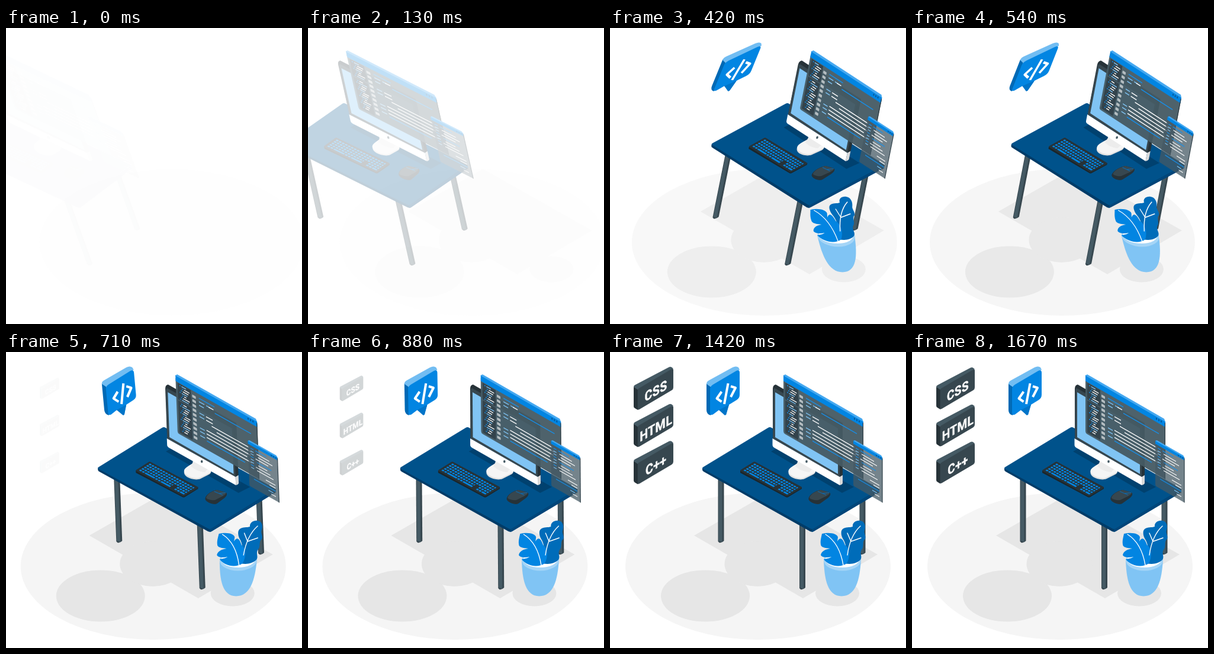
An HTML page for the animation above (1710 ms loop, 500x500 px).

```html
<!DOCTYPE html>
<html lang="en">
<head>
<meta charset="utf-8">
<title>Developer desk</title>
<style>
html, body { margin: 0; width: 100%; height: 100%; overflow: hidden; background: #fff; }
svg { display: block; width: 100%; height: 100%; }
.main { fill: #0285e2; }
.ink { fill: #263238; }
.slate { fill: #37474f; }
.steel { fill: #455a64; }
.pale { fill: #80c4f4; }
.line { fill: none; stroke: #fff; stroke-linecap: round; stroke-linejoin: round; }
text {
  font: 700 22px Roboto, sans-serif; letter-spacing: .4px; text-anchor: middle;
  fill: #fafafa; stroke: #fafafa; stroke-width: .5px; stroke-linejoin: round;
}
</style>
</head>
<body>
<svg viewBox="0 0 500 500">
  <g id="floor">
    <ellipse cx="250" cy="362" rx="224" ry="124" fill="#f5f5f5"/>
    <g fill="#e6e6e6">
      <path d="M142 310 268 238 452 342 326 416Z"/>
      <ellipse cx="161" cy="412" rx="75" ry="43.5"/>
      <ellipse cx="249" cy="358" rx="55.5" ry="38"/>
      <ellipse cx="384" cy="407.500" rx="37" ry="22"/>
    </g>
  </g>

  <g id="desk">
    <g id="legs"></g>
    <path d="M156 196V199Q156 201 159 202.500L338 303Q341 304.500 344 303L455 237V231L341 296Z" fill="#003c68"/>
    <path d="M341 299 455 231V237L344 303Q342 304 341 304Z" fill="#00467a"/>
    <path d="M158 194 267 128Q270 126 273 128L455 231 344 298Q341 300 338 298L158 198Q154 196 158 194Z" fill="#00528b"/>
    <path d="M272 168 290 158 412 228 392 238Z" fill="#00416f"/>

    <path d="M220 200V204L297 245Q299 246 301 245L324 231V228L299 240Z" fill="#1b2529"/>
    <path d="M221 199 242 186Q244 184.500 246 186L323 227.500Q325 229 323 230.500L301 243Q299 244 297 243L221 201.500Q219 200.500 221 199Z" class="ink"/>
    <g id="keys" transform="matrix(1 .55 -1 .62 244 185)" stroke="#0285e2" stroke-width="2.600"></g>

    <path d="M335.500 249C335 241 348 234 356 233L370 237C375 239 371 245 366 248L355 256C350 259 337 254 335.500 249Z" class="ink"/>
    <path d="M337 246C339 239 350 234 356 233L370 237C373 239 367 243 362 245L352 250C347 251 338 249 337 246Z" class="slate"/>
    <path d="M351 235.500 365 241.500M359 239 370 237.500" fill="none" stroke="#0a6cb5"/>

    <path d="M301.500 201C302 196 312 192 318 188L345 198C349 201 347 205 343 207L329 214C323 217 312 215 306 211 302 208 301 205 301.500 201Z" fill="#e0e0e0"/>
    <path d="M302 199C304 195 312 191 318 187L345 197C349 200 347 203 343 205L328 212C322 215 312 212 306 208 302 205 301 202 302 199Z" fill="#f5f5f5"/>
    <path d="M317 177 346 193C346 198 340 197 337 203 328 203 316 197 313 192 318 188 317 183 317 177Z" fill="#ececec"/>
    <path d="M275 62Q275 56 280 55L393 120V208L388 211 275 146Z" class="ink"/>
    <path d="M276 64Q276 60 280 62L388 124V211L275 146Z" class="slate"/>
    <path d="M279 68 385 129V206L279 144Z" class="pale"/>
    <path d="M274.500 146 388 211V225L278 162Q274.500 160 274.500 157Z" fill="#fff"/>
    <path d="M388 211 393 208V222Q391 225 388 225Z" fill="#d9d9d9"/>
    <ellipse cx="332" cy="185" rx="1.800" ry="2.300" class="steel"/>

    <g id="editor" transform="matrix(1 .577 0 1 293 38)">
      <path d="M0 6H135V99H3Q0 99 0 96Z" fill="#455a64" opacity=".95"/>
      <path d="M3 12H25V96H3Z" fill="#2c3a42" opacity=".75"/>
      <path d="M3 41H25" stroke="#455a64" stroke-width="2"/>
      <path d="M0 2Q0 0 2 0H133L135 2V11H0Z" class="main"/>
      <path d="M0 2 3-2H133L135 2Z" fill="#45a8f0"/>
      <path d="M134.500 4V99" stroke="#263238"/>
      <path d="M119 5.500h2m2 0h2m2 0h2" stroke="#0a5795" stroke-width="3"/>
    </g>
    <g id="panel" transform="matrix(1 .577 0 1 411 149)">
      <path d="M0 4H49V77H2Q0 77 0 75Z" fill="#455a64" opacity=".74"/>
      <path d="M0 1 2-1H47L49 1V6H0Z" class="main"/>
      <path d="M0 1 3-1.500H47L49 1Z" fill="#45a8f0"/>
      <path d="M49 2V77" stroke="#37474f" stroke-width="1.300"/>
      <path d="M38 3.500h2m1.500 0h2m1.500 0h2" stroke="#0a5795" stroke-width="2"/>
    </g>
  </g>

  <g id="plant">
    <path d="M361 350C362 386 368 412 391 412.500 415 412 422 386 424 350Z" class="pale"/>
    <ellipse cx="392.500" cy="352" rx="31.300" ry="17.500" fill="#a5d5f7"/>
    <ellipse cx="392.500" cy="350" rx="29" ry="14" fill="#fff"/>
    <path d="M396 352C400 340 400 328 395 318 390 311 389 302 393 299 398 295 405 297 410 295 409 288 416 284 423 285 431 286 432 295 430 301 428 306 433 310 431 316 425 320 430 329 425 334 421 340 427 346 423 351 416 358 406 359 396 357Z" fill="#006cb9"/>
    <path d="M358 307C372 304 384 307 385 313L384 320C390 310 394 318 397 326 405 332 406 346 400 357 389 365 370 362 361 350 367 349 372 348 374 346 366 348 358 347 356 343 357 336 365 333 372 332 363 331 356 330 356 325 355 318 357 313 358 307Z" class="main"/>
    <path class="line" stroke-width="1.400" d="M364 308C380 318 390 336 394 360M423 294C411 305 404 321 401 343M401 306 407 320 424 314"/>
  </g>

  <g id="bubble">
    <path d="M163 53 170 58V107Q163 105 163 98Z" fill="#0069b5"/>
    <path d="M163 54Q163 50 167 48L207 26Q213 23 217 26L219 30 170 59Z" fill="#72bdf2"/>
    <path d="M169 63Q169 58 174 55L213 32Q219 29 219 35V72Q219 78 214 81L201 89 196 106 184 98 174 105.500Q169 108 169 103Z" class="main"/>
    <path d="M184 98 194 107 196 106 201 89Z" fill="#0074c8"/>
    <path class="line" stroke-width="4" style="stroke-linecap:butt" d="M188.500 67 180.500 78.500 188.500 84M199.500 53 193 88M204 58 212 60.500 204 76"/>
  </g>

  <g id="labels"></g>
</svg>
<script>
const LOOP = 1710, STEPS = 41, LEAD = 0.031;
const $ = id => document.getElementById(id);
const add = (id, markup) => $(id).insertAdjacentHTML('beforeend', markup);
const stroke = (x1, x2, y, color, width = 1.5) =>
  `<path d="M${x1} ${y}H${x2}" stroke="${color}" stroke-width="${width}"/>`;

const WHITE = '#fff', LIGHT = '#80c4f4', BLUE = '#1590ec';

for (const [x, top, bottom] of [[182.5, 205, 322], [421.5, 235, 342], [320, 280, 401]])
  add('legs', `<path d="M${x} ${top}h10V${bottom - 3}q-4 4-8 3l-2-2Z" class="slate"/>
    <path d="M${x + 1} ${top}h6V${bottom - 1}l-6-2Z" class="steel"/>`);

for (let row = 0; row < 5; row++) {
  const y = 4 + row * 4.1;
  const keys = row < 3 ? 'H77' : 'H54M61 ' + y + 'H77';
  add('keys', `<path d="M3 ${y}${keys}" stroke-dasharray="${row == 4 ? '3.2 1.3 3.2 1.3 16 1.3' : '3.2 1.3'}"/>`);
}

// Sidebar rows, bullets and code lines, in the plane of the editor window
for (let i = 0; i < 21; i++) {
  if (i == 7) continue;
  const y = 15 + i * 3.8, indent = 6 + (i * 5 % 3) * 2, end = 17 + (i * 7 % 4) * 1.8;
  add('editor', stroke(indent, indent + 2, y, BLUE) + stroke(indent + 3.5, end, y, i % 3 ? WHITE : LIGHT));
}
for (let i = 0; i < 10; i++)
  add('editor', `<rect x="27" y="${18 + i * 7.7}" width="6" height="4.500" rx="1" fill="#b4bdc1"/>`);

const code = [
  [38, 64, 18, BLUE], [38, 47, 24, LIGHT], [50, 56, 24, LIGHT],
  [38, 46, 30, LIGHT], [54, 62, 24, WHITE], [64, 124, 28.5, BLUE],
  [38, 46, 43, LIGHT], [38, 46, 49, LIGHT], [49, 60, 43, WHITE], [49, 60, 49, WHITE],
  [58, 120, 54, WHITE], [66, 124, 60, WHITE],
  [38, 46, 68, LIGHT], [38, 46, 74, LIGHT], [38, 46, 81, LIGHT],
  [49, 122, 66, WHITE], [49, 116, 72, WHITE], [49, 124, 78, WHITE], [49, 112, 84, BLUE]
];
for (const line of code) add('editor', stroke(...line));

for (let i = 0; i < 8; i++) {
  const y = 11 + i * 4.6;
  add('panel', stroke(4, 9, y, i % 3 ? LIGHT : BLUE, 1.2) +
    stroke(12 + i % 3 * 2, 30 + i * 5 % 12, y, i % 4 ? WHITE : BLUE, 1.2));
}
add('panel', stroke(28, 44, 51, WHITE, 1.2) + stroke(34, 44, 56, WHITE, 1.2) +
  stroke(8, 44, 61, BLUE, 1.2) + stroke(32, 40, 66, LIGHT, 1.2) + stroke(36, 44, 70, WHITE, 1.2));

['CSS', 'HTML', 'C++'].forEach((name, i) => add('labels', `<g><g transform="translate(0 ${i * 62.7})">
  <path d="M41 59 48 62V97L43 94Q41 93 41 91Z" class="ink"/>
  <path d="M41 59Q41 57 43 56L99 26.500Q101 25.500 103 26.500L106 29 48 64Z" class="steel"/>
  <path d="M47.500 65Q47.500 62 50 61L103 30Q106 28.500 106 31V60Q106 63 103.500 64.500L51 95.500Q47.500 97.500 47.500 95Z" class="slate"/>
  <text transform="matrix(.866 -.5 0 1 77.500 73)">${name}</text></g></g>`));

// Overshooting cubic-bezier(.36, -.01, .5, 1.38)
const bezier = (u, a, b) => 3 * a * u * (1 - u) ** 2 + 3 * b * u * u * (1 - u) + u ** 3;
function ease(x) {
  if (x <= 0) return 0;
  if (x >= 1) return 1;
  let low = 0, high = 1;
  for (let i = 0; i < 24; i++) {
    const mid = (low + high) / 2;
    if (bezier(mid, .36, .5) < x) low = mid; else high = mid;
  }
  return bezier(low, -.01, 1.38);
}

const place = (node, opacity, transform) => {
  node.setAttribute('opacity', Math.max(0, Math.min(1, opacity)));
  node.setAttribute('transform', transform);
};

// Slide in while skewing, swing past upright twice, then settle
function lightSpeed(id, t, distance, skews, originY) {
  const arrive = ease(t / .6);
  const [a, b, c] = skews;
  const skew = t < .6 ? a + (b - a) * arrive
    : t < .8 ? b + (c - b) * ease((t - .6) / .2)
    : c * (1 - ease((t - .8) / .2));
  const k = Math.tan(skew * Math.PI / 180);
  place($(id), arrive, `matrix(1 0 ${k} 1 ${distance * (1 - arrive) - k * originY} 0)`);
}

function draw(now) {
  // Steps fall on whole hundredths of a second, hence the 5 ms of rounding
  const step = Math.min(STEPS - 1, Math.floor((now % LOOP + 5) / LOOP * STEPS));
  const t = step / 24 + LEAD;
  const slide = ease(t);
  place($('floor'), slide, `translate(${30 * (1 - slide)} 0)`);
  lightSpeed('desk', t, -250, [20, -10, 2], 219);
  lightSpeed('plant', t, 250, [-20, 10, -2], 348.5);
  lightSpeed('bubble', t, -500, [30, -20, 5], 65.5);

  const zoom = ease(t - .66), scale = .5 + .5 * zoom;
  [...$('labels').children].forEach((label, i) => {
    const y = 61.5 + i * 62.7;
    place(label, zoom, `translate(73.5 ${y}) scale(${scale}) translate(-73.5 ${-y})`);
  });
}

let start;
function tick(now) {
  start ??= now;
  draw(now - start);
  requestAnimationFrame(tick);
}
draw(0);
requestAnimationFrame(tick);
</script>
</body>
</html>
```
